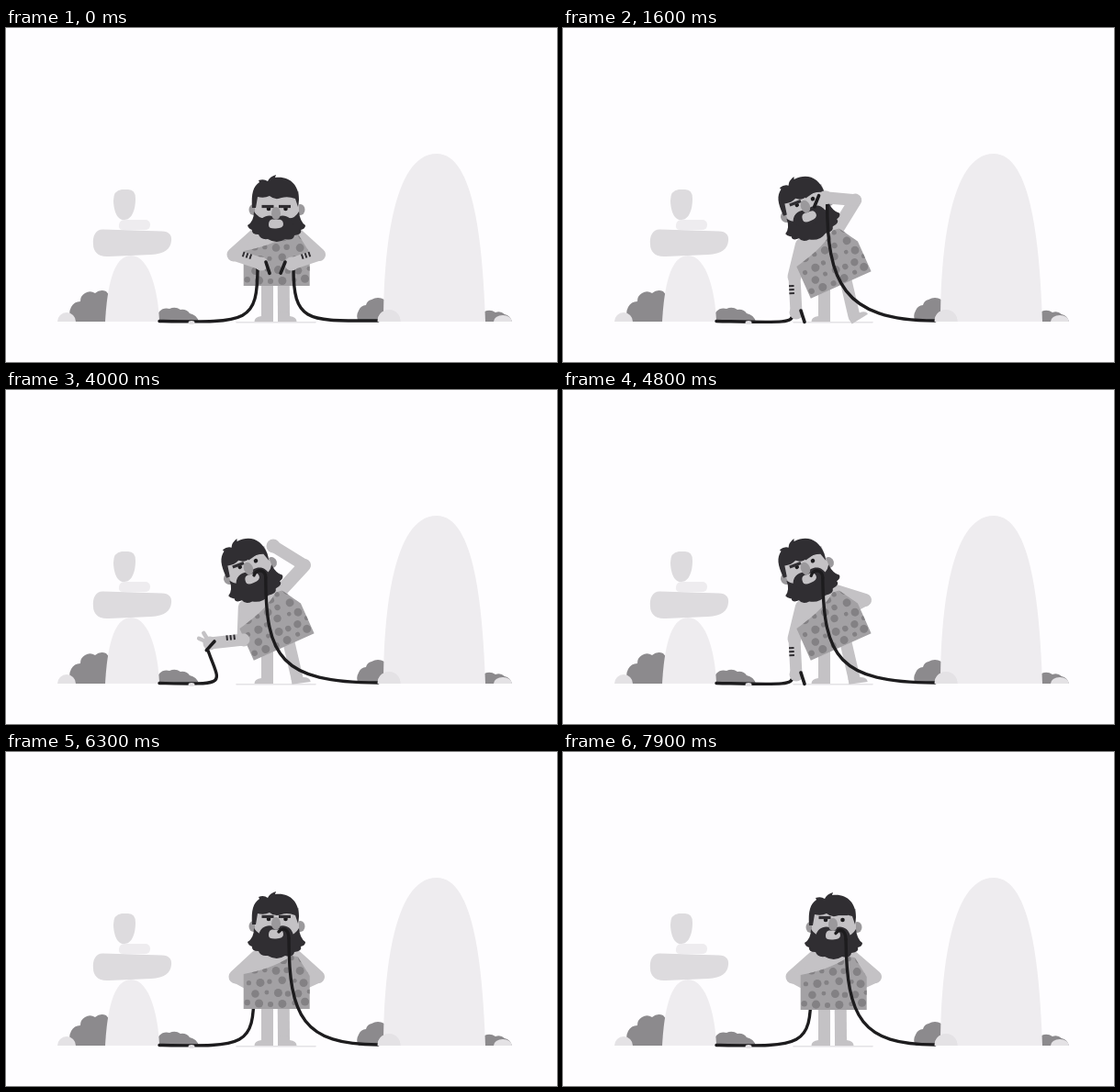
Recreate the animation shown at these times as an HTML page with a canvas. Size 600x364 px, loop 8 s.

```html
<!DOCTYPE html>
<html lang="en">
<head>
<meta charset="utf-8">
<title>Caveman and cables</title>
<style>
html, body { margin: 0; width: 100%; height: 100%; overflow: hidden; background: #fefdff; }
canvas { display: block; width: 600px; height: 364px; }
</style>
</head>
<body>
<canvas id="stage"></canvas>
<script>
const LOOP = 8000, STEP = 100, FLOOR = 320;
const PAPER = '#fefdff', SKIN = '#c4c2c5', HAIR = '#302e32', GREY = '#9b999c', LINE = '#1d1c1e';
const PALE = '#eeecef', STONE = '#dddbde', BUSH = '#8c8a8d', PEBBLE = '#e4e2e5';

const canvas = document.getElementById('stage');
const ctx = canvas.getContext('2d');
const dpr = window.devicePixelRatio || 1;
canvas.width = 600 * dpr;
canvas.height = 364 * dpr;

const rad = deg => deg * Math.PI / 180;
const mix = (a, b, u) => a + (b - a) * u;
const mixPoint = (p, q, u) => [mix(p[0], q[0], u), mix(p[1], q[1], u)];

function ramp(t, from, to) {
  const u = Math.min(1, Math.max(0, (t - from) / (to - from)));
  return u * u * (3 - 2 * u);
}

// Arm poses as [elbow, hand]
const leftArm = {
  plug: [[248, 247], [278, 257]],
  ground: [[252, 271], [254, 310]],
  offer: [[259, 272], [222, 276]],
  back: [[250, 245], [274, 258]]
};
const rightArm = {
  plug: [[341, 247], [311, 257]],
  raised: [[303, 182], [284, 151]],
  mouth: [[322, 189], [286, 193]],
  scratch: [[325, 191], [291, 170]],
  tucked: [[329, 229], [308, 240]],
  back: [[340, 245], [316, 256]]
};

// Each move is [from, to, pose]
function follow(t, pose, ...moves) {
  for (const [from, to, next] of moves) {
    const u = ramp(t, from, to);
    pose = pose.map((p, i) => mixPoint(p, next[i], u));
  }
  return pose;
}

function bush(...points) {
  const path = new Path2D();
  points.forEach(([x, y], i) => {
    if (!i) return path.moveTo(x, y);
    const [px, py] = points[i - 1];
    path.quadraticCurveTo((px + x) / 2 + (y - py) * 0.3, (py + y) / 2 - (x - px) * 0.3, x, y);
  });
  return path;
}

function mound(x, width, height) {
  const path = new Path2D();
  path.ellipse(x, FLOOR, width / 2, height, 0, Math.PI, 0);
  return path;
}

const scenery = [
  [BUSH, bush([72, 320], [71, 304], [81, 298], [86, 289], [97, 289], [109, 287], [116, 320])],
  [BUSH, bush([165, 320], [167, 309], [178, 306], [190, 307], [200, 311], [210, 320])],
  [PALE, new Path2D('M108 320C110 285 116 248 136 248C157 248 166 290 167 320Z')],
  [PALE, new Path2D('M129 209H151Q157 209 157 214.500T151 220H128Q122 220 123 214.500T129 209Z')],
  [STONE, new Path2D('M106 219.500L170 221.500Q181 222 180 232C179 241 173 246 158 247L112 249C100 250 95 243 95 236C94 226 98 219 106 219.500Z')],
  [STONE, new Path2D('M126 176H133Q141 176 141 186C141 198 137 209 129 209C120 210 117 196 117 188Q117 177 126 176Z')],
  [PEBBLE, mound(66, 20, 10)],
  [BUSH, bush([384, 320], [384, 308], [392, 302], [398, 296], [412, 296], [413, 320])],
  [BUSH, bush([521, 320], [521, 309], [533, 310], [543, 312], [551, 320])],
  [PALE, new Path2D('M411 320C411 250 420 137 469 137C511 137 519 240 522 320Z')],
  [PEBBLE, mound(417, 25, 13)],
  [PEBBLE, mound(541, 20, 7)]
];

const shapes = {
  dress: new Path2D('M-36 0V-38C-20 -41 2 -47 16 -58L23 -57L36 -36V0Z'),
  chest: new Path2D('M-22 -64L-36 -36L0 -32L30 -44L22 -64Z'),
  hair: new Path2D('M-27 -2C-28 -18 -26 -25 -19 -30L-20 -32Q-14 -34 -10 -31Q-8 -36 -1 -38L-2 -35C14 -37 24 -27 24 -11L23 -3L20 -12Q12 -15 5 -13Q-2 -10 -8 -15Q-14 -12 -21 -14L-23 -2Z'),
  beard: new Path2D('M-25 2Q-25 13 -32 17Q-31 21 -27 22Q-28 27 -20 27Q-18 33 -10 32Q0 38 9 32Q18 34 19 28Q28 27 26 22Q31 21 31 17Q25 13 24 2Q19 11 10 9H-10Q-19 11 -25 2Z'),
  tache: new Path2D('M-20 10C-18 -1 -7 -3 -1 2C5 -3 16 -1 18 10L10 18H-12Z'),
  lips: new Path2D('M-9 10C-9 3 -5 3 -1 4C4 3 7 4 7 9Q7 13 -1 13.500Q-9 14 -9 10Z'),
  foot: new Path2D('M-6.500 0H6.500Q14 1 14 6H-6.500Z')
};

function place([x, y, deg], [px, py]) {
  const c = Math.cos(rad(deg)), s = Math.sin(rad(deg));
  return [x + px * c - py * s, y + px * s + py * c];
}

function within([x, y, deg], draw) {
  ctx.save();
  ctx.translate(x, y);
  ctx.rotate(rad(deg));
  draw();
  ctx.restore();
}

function fill(path, color) {
  ctx.fillStyle = color;
  ctx.fill(path);
}

function oval(x, y, rx, ry, color) {
  ctx.fillStyle = color;
  ctx.beginPath();
  ctx.ellipse(x, y, rx, ry, 0, 0, 7);
  ctx.fill();
}

function line(points, width, color, cap = 'round') {
  ctx.lineWidth = width;
  ctx.strokeStyle = color;
  ctx.lineCap = cap;
  ctx.beginPath();
  points.forEach(p => ctx.lineTo(...p));
  ctx.stroke();
}

function curve(a, b, c, d) {
  ctx.lineWidth = 3.4;
  ctx.strokeStyle = LINE;
  ctx.lineCap = 'round';
  ctx.beginPath();
  ctx.moveTo(...a);
  ctx.bezierCurveTo(...b, ...c, ...d);
  ctx.stroke();
}

// Both cables hang straight down first, then run along the floor
const sag = y => Math.min(FLOOR + 2, y + 86);

function leftCable([x, y], slack) {
  curve([167, 319.5], [x - 10 + 40 * slack, 321], [x + 14 * slack, sag(y)], [x, y]);
}

function rightCable([x, y], sway) {
  const pull = Math.max(0, 190 - y);
  curve([x, y], [x + sway, sag(y)], [x + 16 + pull + sway, 319], [405, 319]);
}

function cableTip([x, y], deg) {
  const end = [x + Math.cos(rad(deg)) * 13, y + Math.sin(rad(deg)) * 13];
  line([[x, y], end], 3.6, LINE);
}

function forearm([elbow, hand], bandSide, spread) {
  const deg = Math.atan2(hand[1] - elbow[1], hand[0] - elbow[0]) * 180 / Math.PI;
  line([elbow, hand], 13, SKIN);
  oval(...hand, 7.5, 7.5, SKIN);
  if (spread) {
    for (const turn of [30, 65]) within([...hand, deg + turn], () => line([[0, 0], [13 * spread, 0]], 4.5, SKIN));
  }
  if (bandSide) {
    within([...elbow, deg], () => {
      for (const d of [10, 14, 18]) line([[d, bandSide * 6.5], [d, bandSide]], 2, HAIR, 'butt');
    });
  }
}

function drawLegs(body, foot) {
  line([[251, 320.7], [337, 320.7]], 1.6, PEBBLE);
  line([[284.5, 276], [284.5, 319]], 13, SKIN, 'butt');
  ctx.save();
  ctx.translate(284.5, 314);
  ctx.scale(-1, 1);
  fill(shapes.foot, SKIN);
  ctx.restore();
  line([place(body, [7.5, -6]), foot.slice(0, 2)], 13, SKIN, 'butt');
  within(foot, () => {
    oval(0, 0, 6.5, 5, SKIN);
    fill(shapes.foot, SKIN);
  });
}

function drawSpots() {
  let seed = 7;
  const random = () => (seed = seed * 16807 % 2147483647) / 2147483647;
  ctx.clip(shapes.dress);
  for (let row = 0; row < 5; row++) {
    for (let col = 0; col < 6; col++) {
      const x = -32 + col * 12 + row % 2 * 6 + random() * 4;
      const r = 2.3 + (row + col) % 2 * 1.5 + random();
      oval(x, -8 - row * 12 + random() * 4, r, r, '#838184');
    }
  }
}

function drawBody(body) {
  within(body, () => {
    fill(shapes.chest, SKIN);
    fill(shapes.dress, '#a3a1a4');
    drawSpots();
  });
}

function drawEye(x, raise, slant) {
  oval(x + 1, -8, 2.3, 2.3, LINE);
  within([x, -10.5 - raise, slant], () => line([[-6.5, 0], [6.5, 0]], 3.2, HAIR, 'butt'));
}

function drawHead(head, lookDown, raise, slant) {
  within(head, () => {
    oval(-25.5, 0, 5, 6, GREY);
    oval(25.5, 0, 5, 6, GREY);
    ctx.fillStyle = SKIN;
    ctx.fillRect(-24, -20, 48, 34);
    fill(shapes.hair, HAIR);
    fill(shapes.beard, HAIR);
    ctx.translate(0, lookDown);
    fill(shapes.tache, HAIR);
    fill(shapes.lips, SKIN);
    oval(-1, -3, 5, 7, GREY);
    drawEye(-10, 0, 0);
    drawEye(8.5, raise, slant);
  });
}

function draw(t) {
  const rise = ramp(t, 5400, 6200);
  const lean = ramp(t, 100, 800) - rise;
  const dip = 1 - ramp(t, 100, 800);
  const hop = 1.5 * Math.sin(Math.PI * ramp(t, 5900, 6500));
  const step = ramp(t, 1800, 4000);
  const open = ramp(t, 3400, 3800) - ramp(t, 4100, 4400);
  const chewing = (t > 4500 && t < 5400) || (t >= 6600 && t <= 7000) || t >= 7200;
  const sway = chewing ? Math.sin(t / 62) : 0;

  const body = [294.7 + 8 * lean, 281 - lean - hop, -24 * lean];
  const head = [295 - 29 * lean, 191 + 6 * lean + 7 * dip - hop, -21 * lean];
  const foot = [302.5 + 14.5 * lean, 314, -lean * mix(32, 8, step)];

  const armL = follow(t, leftArm.plug, [100, 800, leftArm.ground], [2700, 3400, leftArm.offer],
    [4100, 4500, leftArm.ground], [5400, 6100, leftArm.back]);
  const armR = follow(t, rightArm.plug, [100, 800, rightArm.raised], [1100, 1800, rightArm.mouth],
    [3600, 3900, rightArm.scratch], [4200, 4600, rightArm.tucked], [5400, 6100, rightArm.back]);
  const [handL, handR] = [armL[1], armR[1]];
  const endL = [handL[0] - 4, handL[1] + 2];
  const bite = place(head, [13, 13]);
  const endR = mixPoint([handR[0] + 2, handR[1] + 5], bite, ramp(t, 3500, 3800));

  const frontL = t < 5700;
  const frontR = t < 500 || (t >= 1300 && t < 3800);
  const inMouth = t >= 3700;

  ctx.setTransform(dpr, 0, 0, dpr, 0, 0);
  ctx.fillStyle = PAPER;
  ctx.fillRect(0, 0, 600, 364);
  for (const [color, path] of scenery) fill(path, color);

  drawLegs(body, foot);
  if (!frontL) leftCable(endL, 0);
  line([place(body, [-21, -57]), armL[0]], 15, SKIN);
  line([place(body, [21, -57]), armR[0]], 14, SKIN);
  if (!frontL) forearm(armL);
  if (!frontR) forearm(armR);
  drawBody(body);
  drawHead(head, 7 * dip, 4 * lean + 4 * ramp(t, 7200, 7500), -14 * lean);

  rightCable(endR, sway);
  if (inMouth) curve(place(head, [2, 6 + sway * 0.6]), place(head, [7, 0]), [endR[0], endR[1] - 9], endR);
  if (frontL) {
    leftCable(endL, open);
    forearm(armL, mix(-1, 1, ramp(t, 100, 600)), open);
    cableTip([handL[0] + 5, handL[1] - 2], 72 + 60 * open);
  }
  if (frontR) forearm(armR, t < 400 ? 1 : 0);
  if (!inMouth) cableTip([handR[0] - 7, handR[1] - 2], 112);

  fill(scenery[10][1], PEBBLE);
  oval(202, 321, 3.5, 2, PEBBLE);
}

function tick() {
  const t = performance.now() % LOOP;
  draw(Math.floor(t / STEP) * STEP);
  requestAnimationFrame(tick);
}
tick();
</script>
</body>
</html>
```
